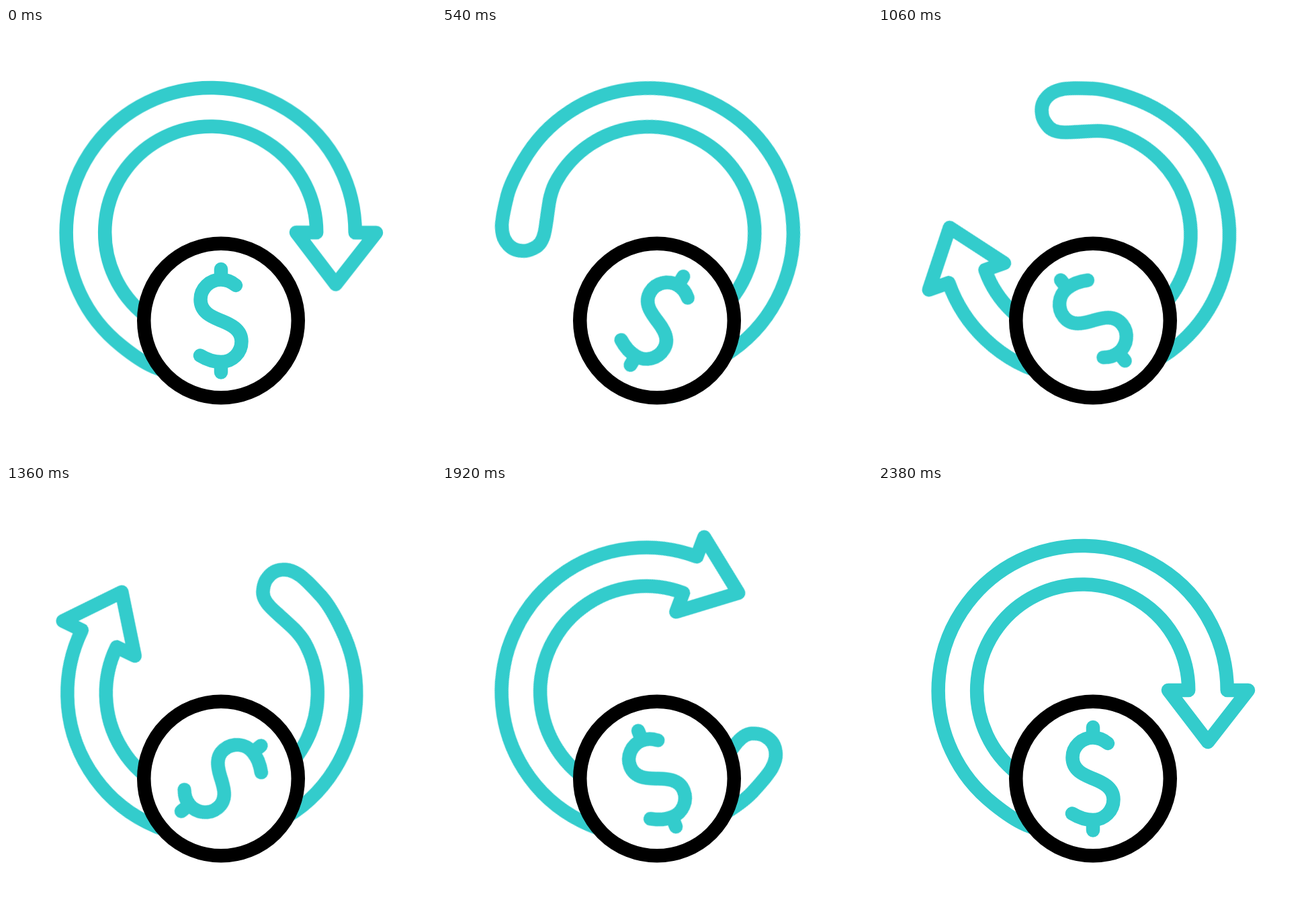
An HTML page for the animation above (2.4 s loop, 640 by 640 pixels).

```html
<!DOCTYPE html>
<html lang="en">
<head>
<meta charset="utf-8">
<title>Refund</title>
<style>
  html, body { margin: 0; width: 100%; height: 100%; overflow: hidden; background: #fff; }
  svg { display: block; width: 100%; height: 100%; }
  svg * { fill: none; stroke: #33cccc; stroke-width: 20.5; stroke-linecap: round; stroke-linejoin: round; }
  .coin { fill: #fff; stroke: #000; }
  .arrow { transform-origin: 306px 306px; animation: turn 2400ms linear infinite; }
  .dollar { transform-origin: 320px 435.5px; animation: turn 2400ms cubic-bezier(.5, 0, .5, 1) infinite; }
  /* one full turn in 2380 ms, then a 20 ms rest */
  @keyframes turn {
    from { transform: rotate(0deg); }
    99.1667%, to { transform: rotate(360deg); }
  }
</style>
</head>
<body>
<svg viewBox="0 0 640 640">
  <path class="arrow" d="M462.2 304 A157.5 157.5 0 1 0 207.7 428.1
    C225 443 250 447 275 455
    C289 459 298 464 301.8 472.5
    C304.5 479 306.8 487 305 494
    C303.5 503 298.5 511 289.9 515.5
    C282 520 273 520.5 262.9 519
    C248 516 234 510 219.7 504.2
    C203 497 188 486 172.3 473.4
    A215 215 0 1 1 519.7 304
    H551 L491 381 L432 304 Z"/>
  <circle class="coin" cx="320" cy="435.5" r="114.75"/>
  <path class="dollar" d="M342 383 C336 378 328 374.5 320 374.5
    C303 374.5 289.5 388 289.5 404
    C289.5 424 308 430.5 320 435.5
    C332 440.5 350.5 447.5 350.5 466.5
    C350.5 483.5 337 497 320 497
    C309 497 298 493 289 487.5
    M320 359 V373 M320 498 V512.5"/>
</svg>
</body>
</html>
```
